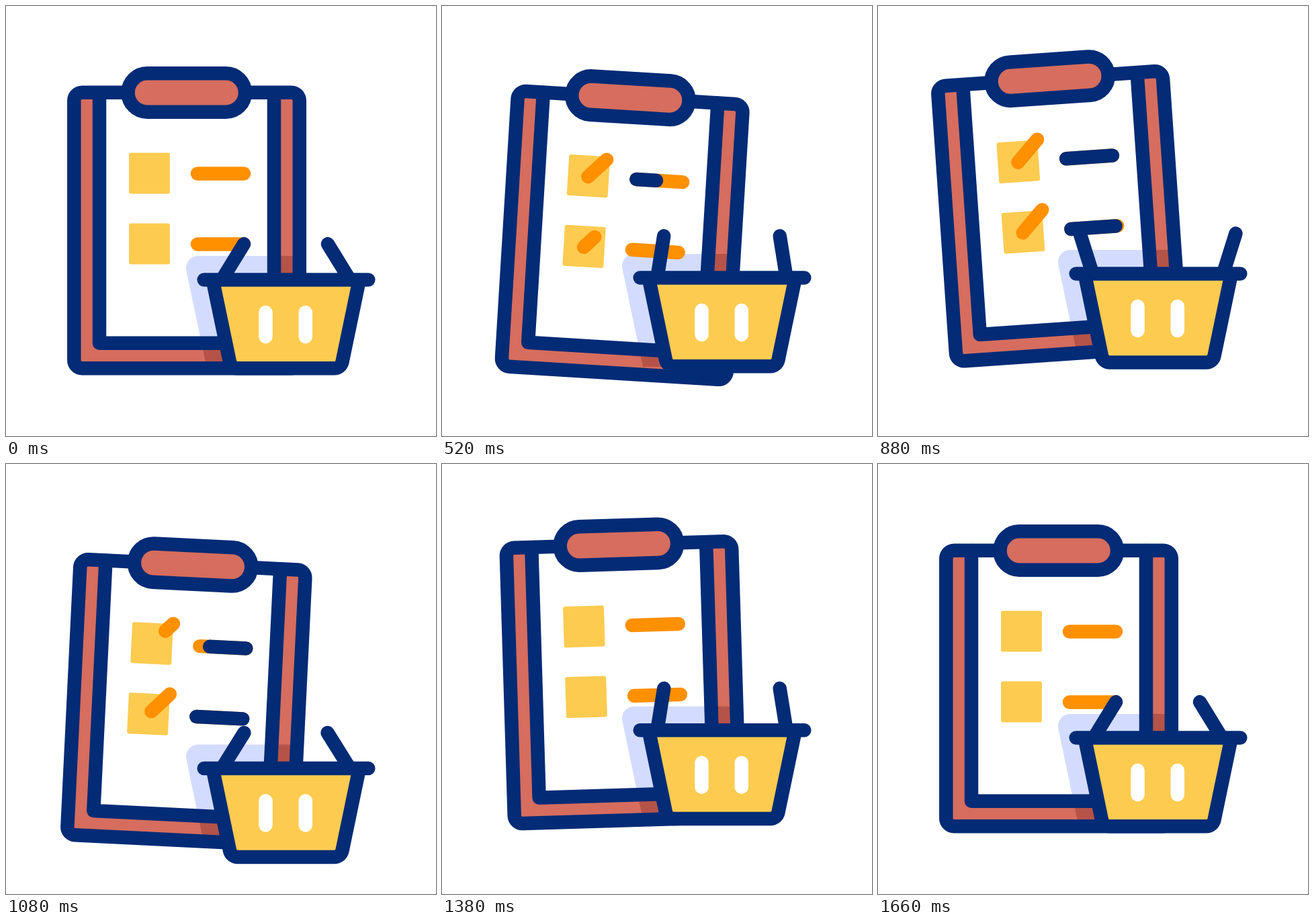
Write an HTML page with a canvas that moves like this. It is 640 px wide and 640 px high and loops after 2.2 s.

```html
<!DOCTYPE html>
<html lang="en">
<head>
<meta charset="utf-8">
<title>Shopping list</title>
<style>
html, body { margin: 0; height: 100%; overflow: hidden; background: #fff; }
canvas { display: block; width: 100vw; height: 100vh; }
</style>
</head>
<body>
<canvas id="stage" width="640" height="640"></canvas>
<script>
const ctx = document.getElementById('stage').getContext('2d');
const LOOP = 2200, LINE = 20.5;
const NAVY = '#032b76', RED = '#d66d5e', DARK_RED = '#b65348', YELLOW = '#fdcb50',
      ORANGE = '#ff9000', SHADE = '#d3dcfe', WHITE = '#fff';

// Motion keys: [time in ms, value], eased in and out between neighbours
const TILT = [[225, 0], [620, 4.1], [865, -4], [1158, 4.1], [1395, -1.8], [1660, 0]];
const BOARD_Y = [[200, 0], [420, 14.5], [780, -25], [830, -25], [1110, 22], [1390, -9], [1660, 0]];
const BASKET_Y = [[200, 0], [358, 48.5], [695, -60], [738, -60], [1035, 48.5], [1360, -11.5], [1660, 0]];
const HANDLE = [[200, 0], [330, 15], [705, -58], [785, -58], [1205, 15], [1395, -23], [1660, 0]];

// Rows of the list: when each mark is drawn and wiped, as [start, duration]
const ROWS = [
  { y: 249.5, check: [[260, 310], [891, 300]], dash: [[378, 330], [1017, 300]] },
  { y: 354.5, check: [[367, 310], [1035, 300]], dash: [[563, 330], [1085, 285]] },
];

function at(keys, t) {
  if (t <= keys[0][0]) return keys[0][1];
  for (let i = 1; i < keys.length; i++) {
    const [t0, a] = keys[i - 1], [t1, b] = keys[i];
    if (t < t1) return a + (b - a) * (1 - Math.cos(Math.PI * (t - t0) / (t1 - t0))) / 2;
  }
  return keys[keys.length - 1][1];
}

const ramp = (t, [start, duration]) => Math.min(1, Math.max(0, (t - start) / duration));

function shape(build, fill, stroke) {
  const path = new Path2D();
  build(path);
  if (fill) { ctx.fillStyle = fill; ctx.fill(path); }
  if (stroke) { ctx.strokeStyle = stroke; ctx.stroke(path); }
}

function line(x0, y0, x1, y1, color) {
  shape(p => { p.moveTo(x0, y0); p.lineTo(x1, y1); }, null, color);
}

// Part of a line between its drawn and wiped ends
function trimmed(x0, y0, x1, y1, color, t, [draw, wipe]) {
  const a = ramp(t, wipe), b = ramp(t, draw);
  if (b <= a) return;
  const dx = x1 - x0, dy = y1 - y0;
  line(x0 + dx * a, y0 + dy * a, x0 + dx * b, y0 + dy * b, color);
}

function toBoard(t) {
  ctx.translate(269, 320 + at(BOARD_Y, t));
  ctx.rotate(at(TILT, t) * Math.PI / 180);
  ctx.translate(-269, -320);
}

// Basket shadow, visible only inside one part of the board
function shadow(t, x, y, w, h, color) {
  ctx.save();
  toBoard(t);
  ctx.beginPath();
  ctx.rect(x, y, w, h);
  ctx.clip();
  ctx.setTransform(1, 0, 0, 1, 0, at(BASKET_Y, t));
  shape(p => {
    p.moveTo(480, 372);
    p.arcTo(263.8, 372, 299, 540, 18);
    p.lineTo(299, 540);
    p.lineTo(480, 540);
  }, color);
  ctx.restore();
}

function board(t) {
  const frame = p => p.roundRect(101.3, 128.8, 335.5, 410.5, 12);
  ctx.save();
  toBoard(t);
  shape(frame, RED);
  ctx.restore();
  shadow(t, 101, 129, 336, 410, DARK_RED);
  ctx.save();
  toBoard(t);
  shape(p => p.rect(139, 129, 260, 373), WHITE);
  ctx.restore();
  shadow(t, 139, 129, 260, 373, SHADE);

  ctx.save();
  toBoard(t);
  shape(p => { p.moveTo(139, 129); p.lineTo(139, 501.8); p.lineTo(399, 501.8); p.lineTo(399, 129); }, null, NAVY);
  shape(frame, null, NAVY);
  shape(p => p.roundRect(181.5, 100.3, 174.5, 57.4, 28.7), RED, NAVY);
  for (const { y, check, dash } of ROWS) {
    shape(p => p.roundRect(183, y - 31, 61, 61, 3), YELLOW);
    trimmed(213, y + .5, 244, y - 31.5, ORANGE, t, check);
    line(285, y, 354, y, ORANGE);
    trimmed(285, y, 354, y, NAVY, t, dash);
  }
  ctx.restore();
}

function basket(t) {
  const angle = (31.6 + at(HANDLE, t)) * Math.PI / 180;
  const dx = 65 * Math.sin(angle), tipY = 409.5 - 65 * Math.cos(angle);
  ctx.save();
  ctx.translate(0, at(BASKET_Y, t));
  line(320, 409.5, 320 + dx, tipY, NAVY);
  line(513, 409.5, 513 - dx, tipY, NAVY);
  shape(p => {
    p.moveTo(308.5, 412);
    p.arcTo(335, 539.3, 416, 539.3, 12);
    p.arcTo(498.5, 539.3, 525, 412, 12);
    p.lineTo(525, 412);
  }, YELLOW, NAVY);
  line(294.7, 407.5, 539.3, 407.5, NAVY);
  for (const x of [386.5, 445.8]) line(x, 456, x, 492, WHITE);
  ctx.restore();
}

function draw(now) {
  const t = now % LOOP;
  ctx.fillStyle = WHITE;
  ctx.fillRect(0, 0, 640, 640);
  ctx.lineWidth = LINE;
  ctx.lineCap = ctx.lineJoin = 'round';
  board(t);
  basket(t);
  requestAnimationFrame(draw);
}
requestAnimationFrame(draw);
</script>
</body>
</html>
```
